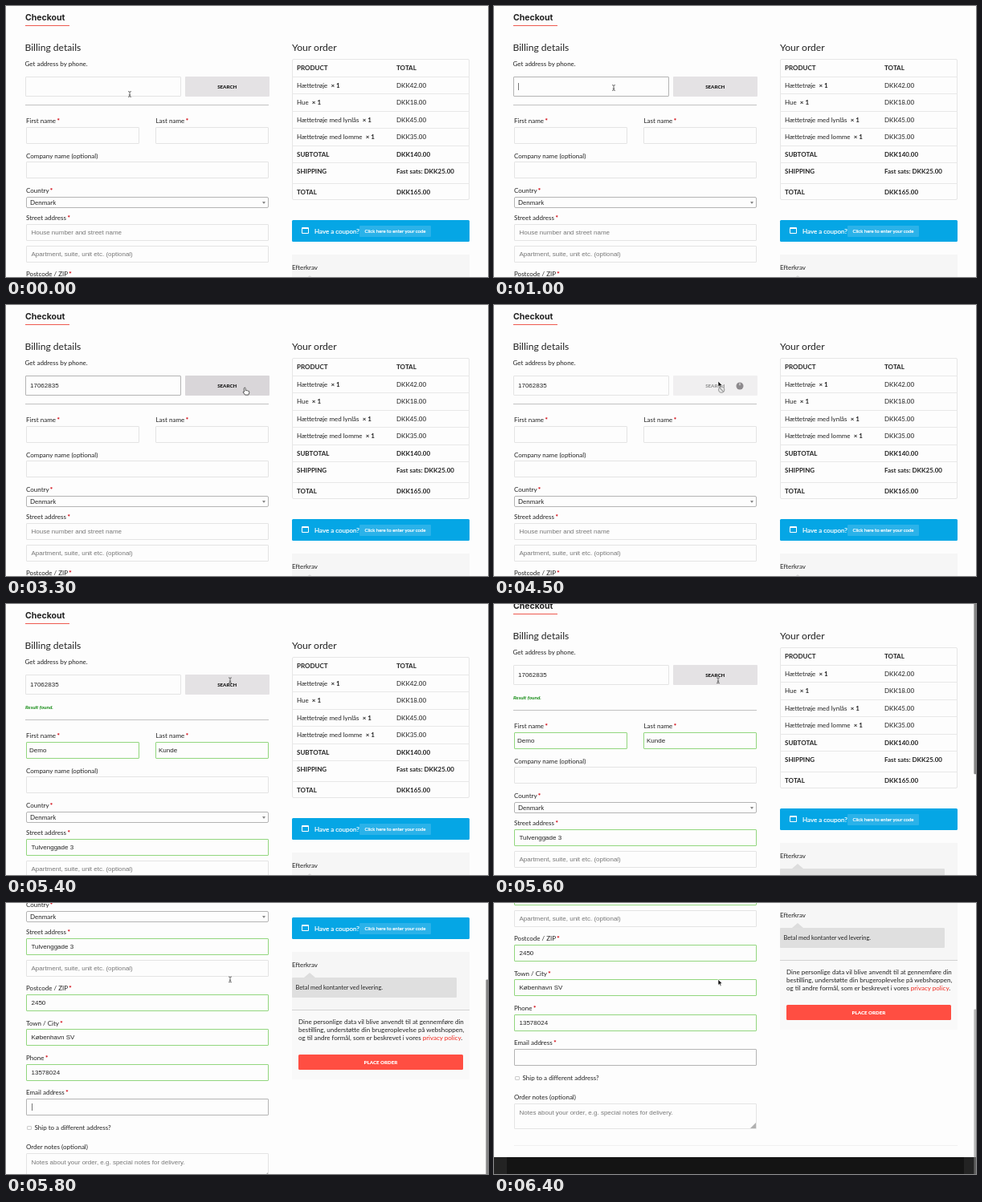
Animation, 600 px wide and 338 px high, one loop 6.5 s. Source, as an HTML page:

```html
<!DOCTYPE html>
<html lang="da">
<head>
<meta charset="utf-8">
<title>Checkout</title>
<style>
html, body { margin: 0; width: 100%; height: 100%; overflow: hidden; background: #fdfdfd; }
#stage { position: relative; width: 600px; height: 338px; overflow: hidden; background: #fdfdfd;
  font: 8px/12px Lato, sans-serif; color: #222; }
#page, #lower { position: absolute; left: 0; top: 0; width: 600px; }
#stage div { box-sizing: border-box; }
.t, .b { position: absolute; white-space: pre; }
.h { font-size: 12.1px; }
.title { font: 700 10.5px/12px Inter, sans-serif; }
.bold, b { font-weight: 700; }
.btn { font-size: 6.2px; font-weight: 900; text-align: center; }
.small { font-size: 6px; }
.pay { font-size: 7.4px; }
.white { color: #fff; }
.coupon { -webkit-text-stroke: .2px #fff; }
i { font-style: normal; font-weight: 900; color: #d4101a; margin-left: -.6px; }
.link { color: #f0281e; }
.in, .notes { font-family: "Liberation Sans", Arial, sans-serif; }
.in { border: 1px solid #e4e4e4; border-radius: 1px; background: #fdfdfd; }
.ph { color: #777; }
.val { display: none; }
.done .val { display: inline; }
.done .val + .ph { display: none; }
.done .auto { border-color: #92d67e; }
.select { border: 1px solid #b4b4b4; border-radius: 2px; }
.in.focus { border-color: #b4b4b4; }
.caret { display: inline-block; height: 9px; border-left: 1px solid #777; vertical-align: -1.5px; margin-right: -1px; }
#search { background: #e4e2e4; }
#search.hover { background: #d9d6d9; }
#search.busy { background: #f0eff0; color: #999; }
#found { font-size: 6.3px; font-weight: 700; font-style: italic; color: #128a12; }
svg { position: absolute; left: 0; top: 0; }
</style>
</head>
<body>
<div id="stage">
  <div id="page"></div>
  <svg width="600" height="338" viewBox="0 0 600 338">
    <rect id="bar" x="597.4" width="3" height="259" rx="1.2" fill="#858585"/>
    <g id="cursor" stroke-linejoin="round" stroke-linecap="round">
      <g id="beam" fill="none">
        <path d="M-1.6-3.4Q0-3.4 0-2.6Q0-3.4 1.6-3.4M0-2.6V2.6M-1.6 3.4Q0 3.4 0 2.6Q0 3.4 1.6 3.4M-.8 1H.8" stroke="#444" stroke-width=".75"/>
      </g>
      <g id="hand">
        <path d="M-.8.8Q-.8-.5.2-.5T1.2.8V3.2Q2.2 2.5 2.9 3.4Q3.9 2.9 4.4 3.8Q5.7 3.4 5.7 4.8V6.4L4.8 8.6H.6L-1.8 5.4Q-2.2 4.2-.8 4.7Z" fill="#fff" stroke="#333" stroke-width=".8"/>
      </g>
      <g id="arrow">
        <path d="M0 0V7L1.6 5.5L2.8 8L4 7.4L2.9 5.1H5Z" fill="#111" stroke="#fff" stroke-width=".6"/>
      </g>
      <g id="stop" fill="#e8e8e8" stroke="#999" stroke-width="1.1">
        <circle cx="4.2" cy="10.5" r="3.6"/><path d="M1.8 8L6.6 13"/>
      </g>
    </g>
  </svg>
</div>
<script>
const LOOP = 6500, STEP = 100;
const phone = "17062835";
const $ = id => document.getElementById(id);

const text = (x, mid, s, cls = "", id = "") =>
  `<div class="t ${cls}" id="${id}" style="left:${x}px;top:${mid - 6}px">${s}</div>`;
const box = (x, y, w, h, css = "", s = "", cls = "", id = "") =>
  `<div class="b ${cls}" id="${id}" style="left:${x}px;top:${y}px;width:${w}px;height:${h}px;${css}">${s}</div>`;
const line = (x, y, w, color) => box(x, y, w, 1, `background:${color}`);
const label = (x, mid, s, must = true) => text(x, mid, s + (must ? " <i>*</i>" : ""));
const input = (x, y, w, s, cls = "", pad = 5.5, id = "", h = 21) =>
  box(x, y, w, h, `padding-left:${pad}px;line-height:${h - 2}px`, s, "in " + cls, id);
const hint = s => `<span class="ph">${s}</span>`;
const val = s => `<span class="val">${s}</span>`;

function billing() {
  const wide = (y, s, cls, id) => input(25, y, 302, s, cls, 5.5, id);
  return line(24, 123, 303, "#c2c2c2") +
    label(25, 143, "First name") + input(25, 151, 140.5, val("Demo"), "auto", 3) +
    label(186.5, 143, "Last name") + input(186, 151, 141, val("Kunde"), "auto", 3) +
    label(25, 186.5, "Company name (optional)", false) + wide(194, "") +
    label(25, 230, "Country") +
    box(25, 238, 302, 13.5, "padding-left:4px;line-height:12.5px", "Denmark", "select") +
    box(319, 243.7, 0, 0, "border:2px solid transparent;border-top:3px solid #888;border-bottom:0") +
    label(25, 264, "Street address") + wide(272, val("Tulvenggade 3") + hint("House number and street name"), "auto") +
    wide(299, hint("Apartment, suite, unit etc. (optional)")) +
    label(25, 334, "Postcode / ZIP") + wide(342, val("2450"), "auto") +
    label(25, 377.5, "Town / City") + wide(385, val("København SV"), "auto") +
    label(25, 421, "Phone") + wide(429, val("13578024"), "auto") +
    label(25, 464, "Email address") + wide(472, "", "", "email") +
    box(26, 505.5, 5.5, 5.5, "border:1px solid #ccc;border-radius:1px") +
    text(35.5, 508, "Ship to a different address?") +
    label(25, 532, "Order notes (optional)", false) +
    input(25, 540, 302, "", "", 5.5, "", 32) +
    text(31.5, 552, "Notes about your order, e.g. special notes for delivery.", "ph notes") +
    `<svg width="10" height="10" style="left:317px;top:562px"><path d="M2 9L9 2V9Z" fill="#b0b0b0"/></svg>` +
    line(25, 592, 552, "#f0f0f0") +
    box(0, 607, 600, 41, "background:linear-gradient(90deg,#232323 16px,#141414 16px 585px,#232323 585px)");
}

function order() {
  const item = s => `${s}  <b>× 1</b>`;
  const rows = [
    ["PRODUCT", "TOTAL", 1], [item("Hættetrøje"), "DKK42.00"], [item("Hue"), "DKK18.00"],
    [item("Hættetrøje med lynlås"), "DKK45.00"], [item("Hættetrøje med lomme"), "DKK35.00"],
    ["SUBTOTAL", "DKK140.00", 1], ["SHIPPING", "Fast sats: DKK25.00", 1], ["TOTAL", "DKK165.00", 1]
  ];
  let html = text(356, 51.5, "Your order", "h") +
    box(356, 66, 221, 176, "border:1px solid #e6e6e6;border-radius:2px");
  rows.forEach(([name, sum, bold], i) => {
    const mid = 77.4 + i * 21.5 + (i > 6 ? 3.8 : 0), cls = bold ? "bold" : "";
    html += text(362, mid, name, cls) + text(486, mid, sum, cls);
    if (i) html += line(356, Math.round(mid - 11), 221, "#e8e8e8");
  });
  return html;
}

function payment() {
  return box(356, 267, 221, 27, "background:#05a6e5;border-radius:1.5px") +
    box(368, 276, 8.5, 8, "border:1px solid #fff;border-top-width:2.5px;border-radius:1px") +
    text(384, 280.5, "Have a coupon?", "white coupon") +
    box(440, 274, 89, 14, "background:#2bb2e9;border-radius:1px") +
    text(446.5, 281, "Click here to enter your code", "small white coupon") +
    box(356, 310, 221, 159, "background:#f6f6f6") +
    box(356, 383, 221, 86, "background:#f9f9f9") +
    text(356, 326, "Efterkrav") +
    box(371, 335.5, 0, 0, "border:7px solid transparent;border-bottom:6.5px solid #ddd;border-top:0") +
    box(356, 341.5, 205, 25.5, "background:#dfdfdf;border-radius:1px") +
    text(360.5, 355, "Betal med kontanter ved levering.", "pay") +
    line(356, 382, 221, "#d2d2d2") +
    text(364, 396.5, "Dine personlige data vil blive anvendt til at gennemføre din") +
    text(364, 406.5, "bestilling, understøtte din brugeroplevelse på webshoppen,") +
    text(364, 416.5, 'og til andre formål, som er beskrevet i vores <span class="link">privacy policy</span>.') +
    box(364, 437.5, 205, 19.5, "background:#ff4e42;border-radius:1.5px;line-height:19.5px", "PLACE ORDER", "btn white");
}

$("page").innerHTML =
  text(24, 15, "Checkout", "title") + box(24, 23.8, 55, 1.2, "background:#ee5a50") +
  text(23.5, 51.5, "Billing details", "h") + text(23.5, 71.5, "Get address by phone.") +
  input(23.5, 88, 194, "", "", 5.5, "phone", 25) +
  box(222.5, 88, 105.5, 25, "line-height:25px;border-radius:1px", "SEARCH", "btn", "search") +
  `<svg id="spin" width="10" height="10" viewBox="-5 -5 10 10" style="left:301px;top:95.7px">
    <circle r="4.5" fill="#8d8a8d"/><path d="M0-3.6V-.8" stroke="#eee" stroke-width="1.1"/></svg>` +
  text(24, 128.5, "Result found.", "", "found") +
  `<div id="lower">${billing()}</div>` + order() + payment();

// Timelines: [ms, value...]
const typed = [1200, 1300, 1400, 1600, 2100, 2300, 2700, 2900];
const caretOn = [[0, 0], [900, 1], [2500, 0], [2700, 1], [3200, 0], [3900, 1], [4100, 0]];
const shapes = [[0, "beam"], [1100, ""], [3000, "beam"], [3100, "hand"], [4400, "arrow stop"],
  [5100, "hand"], [5400, "beam"], [6000, "arrow"]];
const pointer = [[0, 154, 110], [200, 149, 102], [2900, 149, 102], [3000, 200, 103], [3100, 248, 103],
  [3200, 284, 103], [3300, 297, 103.5], [3500, 296, 102.5], [3700, 279, 95], [LOOP, 279, 95.5]];
const scroll = [[0, 0], [5500, 0], [5600, 12], [5700, 130], [5800, 249], [5900, 283],
  [6000, 300], [6100, 308], [6200, 311], [LOOP, 311]];

const held = (keys, t) => keys.filter(k => k[0] <= t).pop()[1];
function lerp(keys, t, n = 1) {
  const i = keys.findIndex(k => k[0] > t), a = keys[i - 1], b = keys[i];
  return a[n] + (b[n] - a[n]) * (t - a[0]) / (b[0] - a[0]);
}
const caret = on => on ? '<span class="caret"></span>' : "";
const show = (id, on) => $(id).style.display = on ? "" : "none";

function draw(t) {
  const done = t >= 5100, busy = t >= 4400 && !done;
  $("phone").innerHTML = phone.slice(0, typed.filter(k => k <= t).length) + caret(held(caretOn, t));
  $("phone").classList.toggle("focus", t >= 900 && t < 4400);
  $("search").classList.toggle("hover", t >= 3100 && t < 4400);
  $("search").classList.toggle("busy", busy);
  show("spin", busy);
  $("spin").style.transform = `rotate(${(t - 4500) * .36}deg)`;

  $("page").classList.toggle("done", done);
  show("found", done);
  $("lower").style.top = done ? "21px" : "0";
  $("email").classList.toggle("focus", done);
  $("email").innerHTML = caret(t >= 5500 && t < 6000);

  const y = lerp(scroll, t);
  $("page").style.transform = `translateY(${-y}px)`;
  show("bar", t >= 5500);
  $("bar").setAttribute("y", -54 + y * .6);
  $("bar").setAttribute("opacity", t >= 6400 ? .6 : 1);

  const shape = held(shapes, t).split(" ");
  for (const id of ["beam", "hand", "arrow", "stop"]) show(id, shape.includes(id));
  $("cursor").setAttribute("transform", `translate(${lerp(pointer, t)} ${lerp(pointer, t, 2)})`);
}

const start = performance.now();
let last = -1;
function tick() {
  const t = Math.floor((performance.now() - start) % LOOP / STEP) * STEP;
  if (t !== last) draw(last = t);
  requestAnimationFrame(tick);
}
tick();
</script>
</body>
</html>
```
